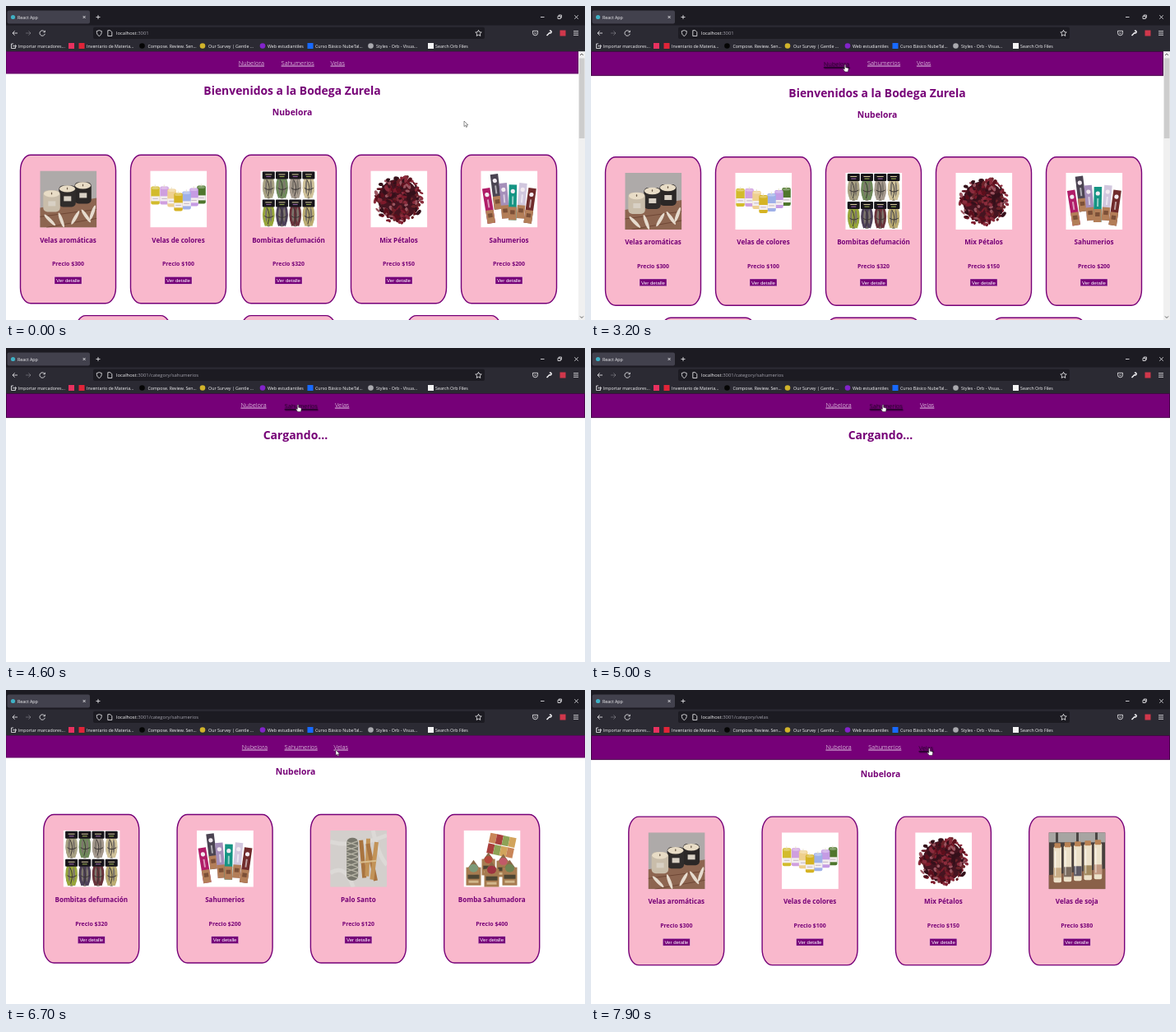
An HTML page that plays this animation: 704 px wide and 382 px high, repeating every 8000 ms.

```html
<!DOCTYPE html>
<html lang="es">
<head>
<meta charset="utf-8">
<title>React App</title>
<style>
html, body { margin: 0; width: 100%; height: 100%; overflow: hidden; background: #fff; }
svg { display: block; }
text { font-family: "Open Sans", "Noto Sans", sans-serif; white-space: pre; }
.b { font-weight: 700; fill: #760077; text-anchor: middle; }
.btn { font: 6.1px "Liberation Sans", Arial, sans-serif; fill: #fff; text-anchor: middle; }
.nav { font-size: 7.5px; font-weight: 300; fill: #fff; text-decoration: underline; }
.nav.on { fill: #25002a; text-shadow: .5px .5px 1px #25002a; }
.ui { font-size: 5.3px; fill: #f4f4f6; }
.line { fill: none; stroke: #f4f4f6; stroke-width: .8; }
</style>
</head>
<body>
<svg id="stage" width="100%" height="100%" viewBox="0 0 704 382"></svg>
<script>
const LOOP = 8000, STEP = 100, GROW = 2.6;
const PURPLE = '#760078', PINK = '#f9b8cc';

const rect = (x, y, w, h, fill, more = '') =>
  `<rect x="${x}" y="${y}" width="${w}" height="${h}" fill="${fill}" ${more}/>`;
const oval = (x, y, rx, ry, fill, more = '') =>
  `<ellipse cx="${x}" cy="${y}" rx="${rx}" ry="${ry}" fill="${fill}" ${more}/>`;
const path = (d, more = 'class="line"') => `<path d="${d}" ${more}/>`;
const text = (x, y, cls, str, size) =>
  `<text x="${x}" y="${y}" class="${cls}"${size ? ` font-size="${size}"` : ''}>${str}</text>`;
const turn = (a, x, y) => `transform="rotate(${a} ${x} ${y})"`;

function seeded(s) {
  return () => (s = (s * 16807) % 2147483647) / 2147483647;
}

// Product pictures, each on a 69 x 69 field
function aroma() {
  const cups = [[42, 14, '#2b2726'], [23, 18, '#302c2b'], [4, 24, '#c9bdaa']];
  return rect(0, 0, 69, 69, '#aeaaa9') +
    path('M0 45L69 33V69H0Z', 'fill="#8d6550"') +
    path('M0 56L69 47M8 69L69 58', 'stroke="#6f4735" fill="none"') +
    cups.map(([x, y, c]) =>
      rect(x, y, 20.5, 26, c, 'rx="5"') + oval(x + 10.2, y + 4, 9.6, 4.2, '#e8dcc6') +
      oval(x + 10.2, y + 3.5, .7, 1.5, '#6b5a48') + rect(x + 6, y + 13, 9, 6, '#d8d0c4')).join('') +
    [[12, 60, -45], [26, 60, -20], [43, 57, 30], [56, 55, -35], [64, 51, 20]].map(([x, y, a]) =>
      oval(x, y, 2, 9.5, '#e6dbce', turn(a, x, y))).join('');
}

function colours() {
  const set = [[1, 19, '#d2bb2c'], [12, 19, '#cf9fdf'], [57, 18, '#4f762d'], [21, 22, '#efd08f'],
    [48, 21, '#c59be4'], [39, 25, '#9fb0e8'], [29, 27, '#d5b323']];
  return rect(0, 0, 69, 69, '#fff') + set.map(([x, y, c]) =>
    rect(x, y, 10.5, 22, c, 'rx="2"') + oval(x + 5.2, y + 2, 4.5, 1.6, '#fff', 'opacity=".3"') +
    rect(x, y + 12, 10.5, 6, '#f3eef0') + rect(x + 2, y + 14.5, 6.5, .8, '#b9a9b8') +
    path(`M${x + 5} ${y + 1}v-3`, 'stroke="#e5dcc0" stroke-width=".8"')).join('');
}

function bundles() {
  const tones = ['#a9a283', '#6f8a5b', '#a5998d', '#d0c299', '#98a63a', '#4d4058', '#69333b', '#bcad72'];
  return rect(0, 0, 69, 69, '#fff') + tones.map((c, i) => {
    const x = 3 + (i % 4) * 16.2, y = i < 4 ? 1 : 35;
    const strands = [0, 1, 2, 3].map(k =>
      path(`M${x + 3 + k * 2.7} ${y + 8}q${k % 2 ? 4 : -4} 11 ${k % 2 ? -1 : 1} 24`,
        `fill="none" stroke="${c}" stroke-width="3"`)).join('');
    return oval(x + 7, y + 20, 7, 13, '#7d766c') + strands +
      path(`M${x + 2} ${y + 20}q5 4 11 0M${x + 5} ${y + 10}q5 8 1 20`, 'fill="none" stroke="#3b3635"') +
      rect(x - .5, y, 15, 9, '#17141a', 'rx="1"') + rect(x + 3, y + 3, 8, 1, '#d8ca9d') +
      rect(x + 4, y + 5.5, 6, 1.2, i % 2 ? '#8e9f4e' : '#8b5c9a');
  }).join('');
}

function petals() {
  const rnd = seeded(77), tones = ['#5c0f1c', '#7d1a2b', '#35101a', '#8a2c3c', '#6b2228', '#9a5560'];
  let out = rect(0, 0, 69, 69, '#fff') + oval(34, 35, 25, 25, '#451420');
  for (let i = 0; i < 190; i++) {
    const a = rnd() * 6.283, r = 29 * Math.sqrt(rnd());
    const x = (34.5 + r * Math.cos(a)).toFixed(1), y = (35 + r * Math.sin(a)).toFixed(1);
    out += oval(x, y, (1.6 + rnd() * 2.4).toFixed(1), (1 + rnd() * 1.3).toFixed(1),
      tones[Math.floor(rnd() * 6)], turn(Math.floor(rnd() * 180), x, y));
  }
  return out;
}

function incense() {
  const set = [[14, 4, -7, '#4b4452'], [24, 15, -5, '#a58fba'], [45, 15, 5, '#d1c7de'],
    [34, 17, 1, '#159483'], [5, 21, -9, '#b01d68'], [55, 21, 8, '#702b2c']];
  return rect(0, 0, 69, 69, '#fff') + set.map(([x, y, a, c]) =>
    `<g ${turn(a, x + 5, y + 22)}>` + rect(x, y, 9.5, 43, c) + rect(x, y + 27, 9.5, 16, '#b37e58') +
    oval(x + 4.7, y + 8, 2.6, 2.6, '#f2eaf0') + rect(x + 3.8, y + 14, 2, 10, '#fff', 'opacity=".55"') +
    rect(x + 2, y + 31, 5.5, 5, '#7c5038') + '</g>').join('');
}

function wood() {
  return rect(0, 0, 69, 69, '#d3cfcc') +
    path('M0 14Q30 22 69 6M0 52Q18 40 28 69M52 0Q58 30 69 42', 'fill="none" stroke="#dcd9d6" stroke-width="5"') +
    rect(20, 9, 14, 52, '#77766c', 'rx="6"') +
    [0, 1, 2, 3, 4, 5, 6].map(i =>
      path(`M20 ${14 + i * 6.5}l14 5m0 -6l-14 5`, 'fill="none" stroke="#b6b3a5" stroke-width="1.3"')).join('') +
    [[37, 12, -5], [43, 10, 2], [48, 16, -12], [51, 14, 7]].map(([x, y, a], i) =>
      rect(x, y, 5, 46, i % 2 ? '#c29358' : '#a97440', turn(a, x + 2, y + 23))).join('') +
    path('M36 39l20 -2', 'fill="none" stroke="#d9bd8d" stroke-width="2"');
}

function bombs() {
  const box = (x, y, c, s = 1) => `<g transform="translate(${x} ${y}) scale(${s})">` +
    path('M2 12L9 2L16 12Z', 'fill="#8a6847"') + rect(0, 11, 18, 22, '#a67b50') +
    oval(9, 12, 5.5, 5, c) + rect(2, 20, 14, 5, '#4d4533') + rect(3, 27, 12, 3, '#d1b68a') + '</g>';
  return rect(0, 0, 69, 69, '#fff') +
    [0, 1, 2, 3, 4, 5, 6, 7].map(i => rect(30 + (i % 4) * 8, 6 + (i >> 2) * 13, 8, 12,
      ['#c98558', '#a83f3c', '#8ea256', '#d2a45c'][(i + (i >> 2)) % 4], turn(12, 46, 18))).join('') +
    box(22, 25, '#b5483c', .9) + box(40, 27, '#c05a68', .9) +
    box(3, 34, '#7d9a78') + box(25, 36, '#9e3441') + box(47, 34, '#6f8453');
}

function soy() {
  return rect(0, 0, 69, 69, '#49403d') + rect(0, 0, 69, 12, '#a7a5a2') +
    path('M10 0v12M35 0v12M58 0v12', 'stroke="#4a4543" stroke-width="3"') +
    path('M0 52L69 44V69H0Z', 'fill="#8a6149"') +
    [0, 1, 2, 3, 4].map(i => {
      const x = 6 + i * 12.3, y = 17 - i;
      return rect(x, y, 9.5, 44, '#ece1c9', 'rx="2"') + rect(x + 1, y - 4, 7.5, 6, '#b98355', 'rx="1"') +
        rect(x, y + 26, 9.5, 12, ['#c9ad86', '#7b6b5e', '#5d5964', '#a28a60', '#c39a83'][i]) +
        rect(x + 1.5, y + 6, 1.3, 30, '#fff', 'opacity=".6"');
    }).join('');
}

const goods = {
  aroma: ['Velas aromáticas', 300, aroma], colours: ['Velas de colores', 100, colours],
  bundles: ['Bombitas defumación', 320, bundles], petals: ['Mix Pétalos', 150, petals],
  incense: ['Sahumerios', 200, incense], wood: ['Palo Santo', 120, wood],
  bombs: ['Bomba Sahumadora', 400, bombs], soy: ['Velas de soja', 380, soy]
};

const shell = (x, y) =>
  rect(x, y, 116, 180.5, PINK, `rx="12.5" ry="19" stroke="${PURPLE}" stroke-width="1.4"`);

function card(key, x, y) {
  const [name, price, draw] = goods[key], mid = x + 58;
  return shell(x, y) +
    `<svg x="${x + 23.8}" y="${y + 19.2}" width="69" height="69" viewBox="0 0 69 69">${draw()}</svg>` +
    text(mid, y + 106.4, 'b', name, 8.1) + text(mid, y + 135, 'b', 'Precio $' + price, 6.95) +
    rect(mid - 16.5, y + 148.2, 33, 8.8, PURPLE, 'stroke="#efd0e6" stroke-width=".4"') +
    text(mid, y + 154.8, 'btn', 'Ver detalle');
}

const row = (keys, x, y, pitch) => keys.map((k, i) => card(k, x + i * pitch, y)).join('');
const category = keys => text(352, 103.3, 'b', 'Nubelora', 10.4) + row(keys, 45.8, 151.5, 162.3);

const pages = {
  home: text(348, 108, 'b', 'Bienvenidos a la Bodega Zurela', 13.9) +
    text(348, 133.3, 'b', 'Nubelora', 10.4) +
    row(['aroma', 'colours', 'bundles', 'petals', 'incense'], 17.5, 181.2, 134) +
    [84.5, 285.5, 486.5].map(x => shell(x, 376.6)).join(''),
  loading: text(352, 108, 'b', 'Cargando...', 14),
  incense: category(['bundles', 'incense', 'wood', 'bombs']),
  candles: category(['aroma', 'colours', 'petals', 'soy'])
};

const marks = [
  [98, 92, '#e02438', 'Inventario de Materia...', 1], [172.5, 165.5, '#050505', 'Compose. Review. Sen...'],
  [246, 239, '#d0b32a', 'Our Survey | Gentle ...'], [318, 312, '#8223c9', 'Web estudiantiles'],
  [376, 370, '#1769ff', 'Curso Básico NubeTal...', 1], [450, 443.5, '#a9a9ae', 'Styles - Orb - Visua...'],
  [522, 516.5, '#f4f4f4', 'Search Orb Files', 1]
];
const badge = (x, y, c, square) => square ? rect(x - 3.5, y - 3.5, 7, 7, c) : oval(x, y, 3.3, 3.3, c);

const chrome = rect(0, 0, 704, 24, '#1c1b22') + rect(0, 23.5, 704, 31.7, '#2b2a33') +
  rect(1.5, 5.5, 100.5, 16, '#42414d', 'rx="2"') + oval(8.5, 13.5, 2.6, 2.6, '#3fb0c4') +
  text(14, 15.6, 'ui', 'React App', 5.4) +
  path('M93.6 12l3 3m0-3l-3 3M109.5 13.5h5m-2.5-2.5v5M650 13.5h4.5M671 12.3h3.2v3.2h-3.2zM672.2 12v-1h3.2v3.2h-1M691.3 11.3l4.4 4.4m0-4.4l-4.4 4.4') +
  path('M14 33H8m2.6-2.7L8 33l2.6 2.7M46.8 31.2a3.2 3.2 0 1 0 .5 2.6M47.4 29.8v2h-2') +
  path('M24 33h6m-2.6-2.7L30 33l-2.6 2.7', 'class="line" opacity=".35"') +
  rect(106, 25.8, 476, 14.2, '#1c1b22', 'rx="2"') +
  path('M113.3 29.6l3 1c0 3-.6 4.7-3 6c-2.4-1.3-3-3-3-6zM123.8 29.7h3l2 2v4.8h-5z') +
  path('M574.5 29.3l1.1 2.4 2.6.3-1.9 1.8.5 2.6-2.3-1.3-2.3 1.3.5-2.6-1.9-1.8 2.6-.3z') +
  path('M640.5 30.3h6v2.5a3 3 0 0 1-6 0zM642 32.3l1.5 1.4 1.5-1.4M690 30.7h6M690 33h6M690 35.3h6') +
  path('M657.5 36l3.5-3.5M661 32.5a1.3 1.3 0 1 0 0-2', 'class="line" style="stroke-width:1.5"') +
  badge(677, 33, '#d0374b', 1) +
  path('M9 46H6.5v5.5h5v-2M8 48.7h4.5m-1.6-1.6l1.6 1.6-1.6 1.6') +
  text(14.8, 50.5, 'ui', 'Importar marcadores...', 5.25) + badge(79.5, 48.5, '#e8315f', 1) +
  marks.map(([x, ix, c, s, sq]) => badge(ix, 48.5, c, sq) + text(x, 50.5, 'ui', s)).join('');

const scrollbar = rect(696, 55.2, 8, 327, '#f0f0f0') + rect(696.8, 63.5, 6.7, 97.5, '#cdcdcd') +
  path('M698 60l2-2 2 2M698 377.5l2 2 2-2', 'fill="none" stroke="#505050" stroke-width=".9"');

const links = [['Nubelora', -65.2], ['Sahumerios', -13.4], ['Velas', 46.5]];

const stage = document.getElementById('stage');
stage.innerHTML = rect(0, 0, 704, 382, '#fff') +
  `<g id="body">${Object.entries(pages).map(([k, v]) => `<g id="${k}">${v}</g>`).join('')}</g>` +
  rect(.5, 55.5, 703, 26.5, PURPLE, 'id="bar"') +
  links.map(([s], i) => `<text id="link${i}" class="nav">${s}</text>`).join('') +
  `<g id="scroll">${scrollbar}</g>` + chrome +
  '<text x="134" y="35.2" class="ui" style="font-size:5.9px">localhost<tspan id="url" fill="#a2a1ab"></tspan></text>' +
  path('M0 0v6.6l1.6-1.4 1 2.3 1.1-.5-1-2.2h2.1z', 'id="arrow" fill="#fff" stroke="#222" stroke-width=".5"') +
  path('M-.7.3q.7-.8 1.4 0v3l2.8.7q.8.3.6 1.2l-.6 3.3h-3.7l-2.3-3q.3-1 1.8 0z',
    'id="hand" fill="#fff" stroke="#222" stroke-width=".5"');
const el = id => document.getElementById(id);

// Time, value: each holds until the next
const pageAt = [[0, 'home'], [4600, 'loading'], [5300, 'incense'], [7200, 'loading'], [7700, 'candles']];
const urlAt = [[0, ''], [4600, '/category/sahumerios'], [7200, '/category/velas']];
const hoverAt = [[0, -1], [2900, 0], [3500, -1], [4100, 1], [6200, -1], [6900, 2]];
// Time, x, y of the pointer tip
const track = [[0, 557, 140], [1900, 557, 140], [2050, 544, 151], [2200, 508, 157], [2350, 447, 145],
  [2500, 420, 114], [2600, 420, 114], [2800, 368, 88], [3000, 312, 73], [3200, 309, 71.5],
  [3400, 311, 71], [3600, 334, 66], [3800, 354, 63], [3900, 355, 62.5], [4100, 355, 66], [4300, 355, 69],
  [6100, 355, 69], [6300, 363, 77], [6500, 384, 77], [6700, 401, 73], [6900, 408, 71], [7200, 411.5, 71], [8000, 411.5, 71]];

const held = (keys, t) => keys.filter(k => k[0] <= t).pop()[1];

function pointer(t) {
  const i = Math.max(1, track.findIndex(k => k[0] >= t));
  const a = track[i - 1], b = track[i], f = (t - a[0]) / (b[0] - a[0]);
  return [1, 2].map(n => a[n] + (b[n] - a[n]) * f);
}

function draw(ms) {
  const t = Math.floor((ms % LOOP) / STEP) * STEP;
  const page = held(pageAt, t), hover = held(hoverAt, t), over = hover >= 0;
  const wide = page === 'home' ? 696 : 704;
  for (const k in pages) el(k).style.display = k === page ? '' : 'none';
  el('scroll').style.display = page === 'home' ? '' : 'none';
  el('body').setAttribute('transform', `translate(0 ${over ? GROW : 0})`);
  el('bar').setAttribute('width', wide - 1);
  el('bar').setAttribute('height', 26.5 + (over ? GROW : 0));
  el('bar').setAttribute('stroke', over ? '#470049' : '#620064');
  el('url').textContent = ':3001' + held(urlAt, t);
  links.forEach(([, x], i) => {
    const link = el('link' + i);
    link.setAttribute('x', wide / 2 + x + (over ? Math.sign(i - hover) * 1.4 : 0));
    link.setAttribute('y', i === hover ? 73.3 : 71.7);
    link.setAttribute('class', i === hover ? 'nav on' : 'nav');
  });
  const [x, y] = pointer(t);
  for (const id of ['arrow', 'hand']) {
    el(id).setAttribute('transform', `translate(${x} ${y})`);
    el(id).style.display = (id === 'hand') === over ? '' : 'none';
  }
}

const start = performance.now();
function tick() {
  draw(performance.now() - start);
  requestAnimationFrame(tick);
}
tick();
</script>
</body>
</html>
```
